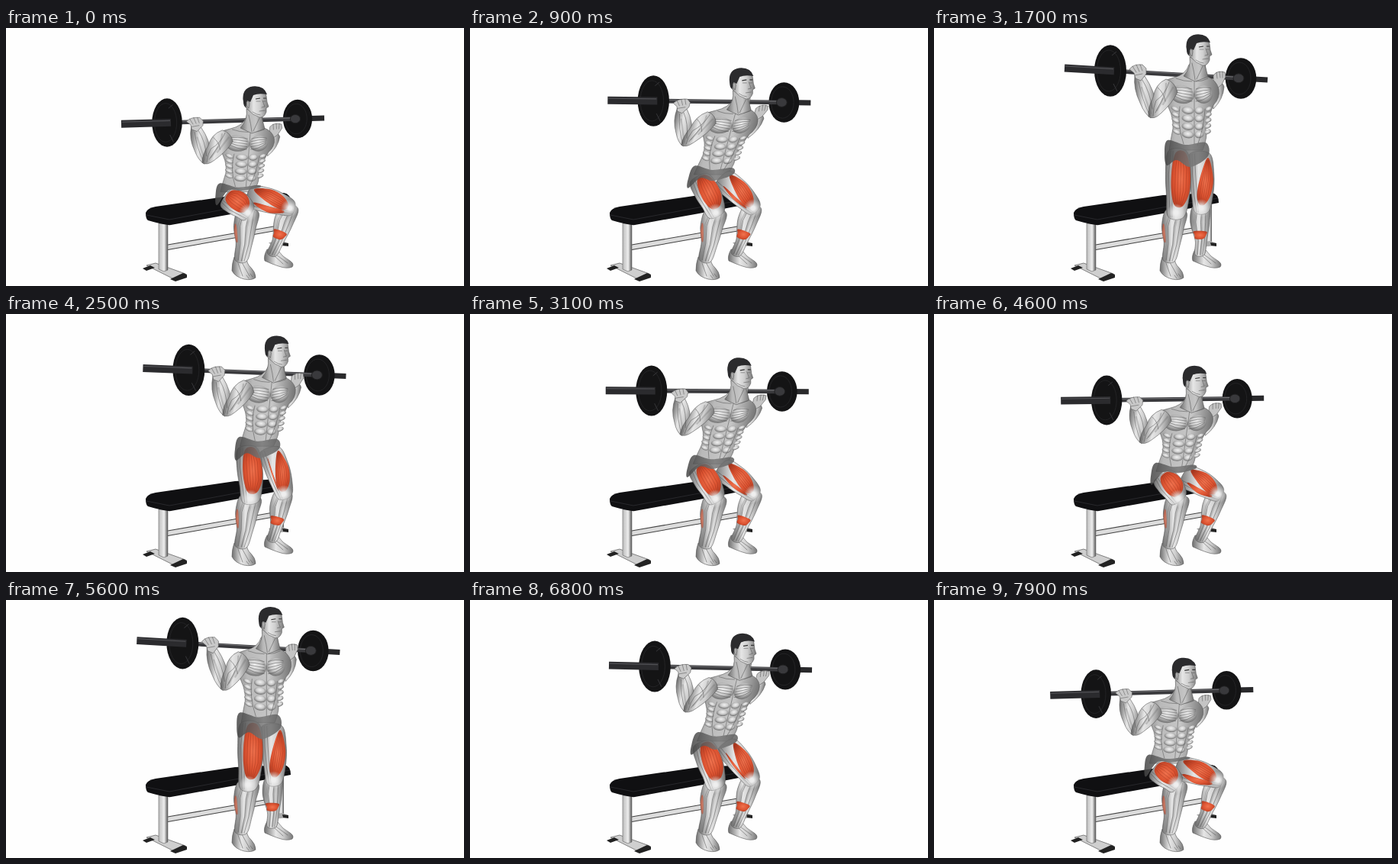
An HTML page for the animation above (8 s loop, 600x338 px).

```html
<!DOCTYPE html>
<html lang="en">
<head>
<meta charset="utf-8">
<title>Barbell bench squat</title>
<style>
  html, body { margin: 0; width: 100%; height: 100%; overflow: hidden; background: #fefefe; }
  svg { display: block; width: 100vw; height: 100vh; }
  .skin { stroke: #555; stroke-width: .6; stroke-linejoin: round; }
  .line { fill: none; stroke: #484848; stroke-width: .7; stroke-linecap: round; opacity: .7; }
  .soft { fill: none; stroke: #666; stroke-width: 2.4; stroke-linecap: round; opacity: .28; }
  .fibre { fill: none; stroke: #8f2c18; stroke-width: .7; opacity: .5; }
</style>
</head>
<body>
<svg viewBox="0 0 600 338" preserveAspectRatio="none">
  <defs>
    <linearGradient id="body">
      <stop offset="0" stop-color="#6d6d6d"/><stop offset=".3" stop-color="#b9b9b9"/>
      <stop offset=".65" stop-color="#c6c6c6"/><stop offset="1" stop-color="#747474"/>
    </linearGradient>
    <linearGradient id="limb">
      <stop offset="0" stop-color="#6f6f6f"/><stop offset=".4" stop-color="#e6e6e6"/>
      <stop offset=".65" stop-color="#cfcfcf"/><stop offset="1" stop-color="#777"/>
    </linearGradient>
    <radialGradient id="bulge" cx=".5" cy=".4" r=".55">
      <stop offset="0" stop-color="#f0f0f0"/><stop offset=".55" stop-color="#cdcdcd"/>
      <stop offset="1" stop-color="#7d7d7d"/>
    </radialGradient>
    <radialGradient id="glow">
      <stop offset=".2" stop-color="#eee"/><stop offset="1" stop-color="#ddd" stop-opacity="0"/>
    </radialGradient>
    <radialGradient id="red" r=".62">
      <stop offset="0" stop-color="#f0734f"/><stop offset=".55" stop-color="#dc5331"/>
      <stop offset="1" stop-color="#a93a22"/>
    </radialGradient>
    <linearGradient id="shorts">
      <stop offset="0" stop-color="#444"/><stop offset=".6" stop-color="#787878"/><stop offset="1" stop-color="#5c5c5c"/>
    </linearGradient>
    <linearGradient id="post">
      <stop offset="0" stop-color="#bbb"/><stop offset=".6" stop-color="#eee"/><stop offset="1" stop-color="#555"/>
    </linearGradient>
  </defs>

  <g id="bench">
    <path d="M356 231h8v51h-8z" fill="url(#post)"/>
    <path d="M344 281l18 -2 8 3v3l-20 2z" fill="#aaa"/><path d="M362 281l8 1v4l-7 -1z" fill="#222"/>
    <path d="M212 284L356 259v6L212 291z" fill="#dcdcdc"/>
    <path d="M212 284L356 259M212 290.5L356 265" stroke="#444" stroke-width="1.1"/>
    <path d="M184 311l12 -3 39 14 -1 5 -14 2z" fill="#cfcfcf" stroke="#555" stroke-width=".7"/>
    <path d="M179 315l10 -4 6 3 -11 4zM215 329l17 -8 5 2v4l-15 5z" fill="#222"/>
    <path d="M200 256h12v61l-5 2 -7 -3z" fill="url(#post)" stroke="#666" stroke-width=".6"/>
    <path d="M183 242Q185 236 196 234L300 219 364 216Q373 217 373 229L300 243 216 258Q210 259 186 252Q183 250 183 242Z" fill="#101012"/>
    <path d="M184 245L214 251 300 235 372 223" fill="none" stroke="#333337" stroke-width=".7"/>
  </g>

  <g id="bar">
    <path id="farEnd" stroke="#29292b" stroke-width="7"/>
    <g id="farPlate">
      <ellipse rx="20.3" ry="26.8" fill="#141415"/>
      <ellipse cx="-2" rx="15" ry="21" fill="none" stroke="#242426"/>
    </g>
    <path id="shaft" stroke="#39393c" stroke-width="5.6"/>
    <path id="shine" stroke="#737376"/>
    <ellipse id="collar" rx="7" ry="6" fill="#39393c" stroke="#1f1f20"/>
    <g id="nearPlate">
      <ellipse rx="21" ry="33.8" fill="#141415"/>
      <ellipse cx="-2" rx="15.5" ry="27" fill="none" stroke="#242426"/>
      <path d="M4 17l5 10M2 -20l6 -5" stroke="#38383b"/>
    </g>
    <path id="sleeve" stroke="#2b2b2e" stroke-width="9.8"/>
    <path id="sleeveShine" stroke="#505054" stroke-width="1.2"/>
  </g>

  <g id="upper">
    <path class="skin" fill="url(#limb)" d="M364 74Q378 68 380 77 379 93 366 106L360 92Z"/>
    <path class="skin" fill="#c4c4c4" d="M366 62Q371 55 381 58L382 64 377 74 370 80 366 72Z"/>
    <path class="line" d="M370 58l1 8M374 57l1 8M378 57v8M372 79Q374 90 366 99"/>
    <path class="skin" fill="url(#body)" d="M334 48Q330 61 314 65 298 69 291 80 303 92 308 106 314 119 313 132 310 146 308 160L352 160Q359 142 356 132 360 115 366 101 375 92 373 80 370 68 357 63L355 46Z"/>
    <g id="muscles"></g>
    <path class="line" d="M341 69V152M334 50Q338 63 341 69M354 52Q348 62 344 69M322 103Q318 126 327 152M355 106Q354 130 345 154"/>
    <path class="skin" fill="url(#limb)" d="M263 62Q261 80 270 98 276 113 284 118L292 104Q289 82 276 63Z"/>
    <path class="skin" fill="url(#limb)" d="M304 67Q290 73 287 91 280 104 281 116 288 121 297 112 312 99 319 84 316 71 304 67Z"/>
    <path class="soft" d="M272 78L284 112M304 73Q305 88 292 108M313 78L300 100"/>
    <path class="line" d="M268 70Q272 93 283 115M273 68Q283 84 286 106M293 78Q302 86 303 96M308 71Q303 87 291 95 287 104 287 115M300 92L290 111"/>
    <path class="skin" fill="#c9c9c9" d="M256 54Q261 47 273 48L278 53 278 60 271 69 264 66 262 59Z"/>
    <path class="line" d="M260 50l5 8M265 48l4 9M270 48l3 8M263 62l10 -2"/>
  </g>

  <g id="head">
    <path class="skin" fill="url(#body)" d="M335 38Q337 52 327 63L342 70 359 64 354 45Z"/>
    <path class="line" d="M338 46Q341 58 342 68M352 50L344 67"/>
    <path class="skin" fill="url(#limb)" d="M331 24Q332 10 346 10 360 10 361 21L362 29 364 35 361 37 361 42Q358 50 352 49 343 46 337 39 332 36 331 24Z"/>
    <path fill="#2b2b2d" d="M331 29Q328 11 343 8.5 358 7 362 19 351 17 344 20L340 29 336 27 334 36Q331 34 331 29Z"/>
    <path class="skin" fill="#aaa" d="M335 29Q338 26 339 31L338 37Q335 36 335 29Z"/>
    <path fill="none" stroke="#333" stroke-width="1.2" d="M347 25l6 -1M357 24h4"/>
    <path class="line" d="M348 28h5M357 28h3M356 27l3 8 -4 1M352 41l7 -1M343 42Q349 46 353 46"/>
  </g>

  <g class="skin" fill="url(#limb)">
    <path d="M342 290Q337 299 339 305 348 309 357 312 368 316 375 313 378 309 372 305 362 300 356 291Z"/>
    <path d="M299 300Q296 308 296 318 300 326 312 329 322 331 327 327 327 320 321 314 315 309 315 300Z"/>
    <path class="line" d="M350 297l13 12M354 297l15 11M304 308l6 17M309 307l10 18M315 324l3 4M320 322l3 4"/>
  </g>
  <g id="legs"></g>
</svg>
<script>
const el = id => document.getElementById(id);
const mix = (a, b, u) => a + (b - a) * u;
const ramp = (t, from, to) => {
  const u = Math.min(1, Math.max(0, (t - from) / (to - from)));
  return u * u * (3 - 2 * u);
};

function add(parent, tag, attrs) {
  const node = document.createElementNS('http://www.w3.org/2000/svg', tag);
  for (const k in attrs) node.setAttribute(k, attrs[k]);
  return el(parent).appendChild(node);
}

// Two repetitions per loop; 0 is seated, 1 is standing.
const LOOP = 8000, REP = 4000;
const rise = t => ramp(t, 180, 1680) * (1 - ramp(t, 1815, 4065));

// Chest muscles, mirrored about the breastbone; the far side is narrower.
function addMuscles() {
  const bulge = (cx, cy, rx, ry, turn = 0) => add('muscles', 'ellipse',
    { cx, cy, rx, ry, fill: 'url(#bulge)', transform: `rotate(${turn} ${cx} ${cy})` });
  const line = d => add('muscles', 'path', { class: 'line', d });
  for (const side of [-1, 1]) {
    const depth = side < 0 ? 1 : .75, x = off => 341 + side * depth * off;
    bulge(x(16), 87, 16 * depth, 12, side * -12);
    for (let i = 0; i < 5; i++) line(`M${x(3)} ${80 + i * 4}Q${x(16)} ${76 + i * 5} ${x(29)} ${79 + i * 2}`);
    for (let row = 0; row < 4; row++) bulge(x(8.5), 108 + row * 10.5, 8 * depth, 4.8, side * -8);
    for (let rib = 0; rib < 5; rib++) bulge(x(25 - rib * .4), 106 + rib * 7.5, 6 * depth, 2.8, side * -28);
    line(`M${x(3)} 70Q${x(14)} 70 ${x(24)} 66`);
  }
}

const pair = p => p[0].toFixed(2) + ' ' + p[1].toFixed(2);
const stroke = pts => 'M' + pts.map(pair).join('L');

function closed(pts) {
  const n = pts.length, at = i => pts[(i + n) % n];
  const handle = (i, s) => [0, 1].map(k => at(i)[k] + s * (at(i + 1)[k] - at(i - 1)[k]) / 6);
  return 'M' + pair(pts[0]) + pts.map((_, i) =>
    'C' + [handle(i, 1), handle(i + 1, -1), at(i + 1)].map(pair).join(' ')).join('') + 'Z';
}

// A bone carries profile rows: [position along, reach left, reach right].
function lane(a, b, rows, f) {
  const dx = b[0] - a[0], dy = b[1] - a[1], len = Math.hypot(dx, dy);
  return rows.map(([u, left, right]) => {
    const off = mix(-left, right, f) / len;
    return [a[0] + dx * u + dy * off, a[1] + dy * u - dx * off];
  });
}
const limb = (a, b, rows) => closed([...lane(a, b, rows, 1), ...lane(a, b, rows, 0).reverse()]);
const lanes = (a, b, rows, at) => at.map(f => stroke(lane(a, b, rows, f))).join('');

const profile = {
  farShin: [[-.05, 10, 10], [.3, 14, 11], [.7, 7, 8], [1, 7, 5]],
  farCalf: [[.5, 9, 7], [.58, 8, 7], [.66, 7, 3]],
  farThigh: [[-.05, 13, 13], [.35, 14, 18], [.75, 12, 16], [1.08, 8, 9]],
  farQuad: [[.08, -8, 13], [.45, 1, 17], [.75, 5, 13], [.93, 2, 5]],
  nearShin: [[-.05, 12, 13], [.3, 16, 13], [.65, 10, 11], [1, 8, 7]],
  nearCalf: [[.28, 15, -13], [.45, 14, -10], [.62, 10, -8]],
  nearThigh: [[-.12, 12, 12], [.3, 15, 18], [.7, 13, 17], [1.08, 10, 10]],
  nearQuad: [[-.1, 2, 10], [.2, 7, 17], [.6, 7, 17], [.87, 2, 9]],
};
const underThigh = k => [[.15, 5 + 3 * k, -5], [.5, 5 + 8 * k, -5], [.85, 5 + 4 * k, -5]];

const nodes = {};
const path = (name, attrs) => { nodes[name] = add('legs', 'path', attrs); };
for (const side of ['far', 'near']) {
  path(side + 'Shin', { class: 'skin', fill: 'url(#limb)' });
  path(side + 'ShinShade', { class: 'soft' });
  path(side + 'ShinLines', { class: 'line' });
  path(side + 'Calf', { fill: 'url(#red)', opacity: side === 'far' ? 1 : .6 });
  path(side + 'Thigh', { class: 'skin', fill: 'url(#limb)' });
  path(side + 'ThighLines', { class: 'line' });
  if (side === 'far') path('under', { fill: 'url(#red)' });
  path(side + 'Quad', { fill: 'url(#red)' });
  path(side + 'Fibres', { class: 'fibre' });
  nodes[side + 'Knee'] = add('legs', 'ellipse', { rx: 12, ry: 12, fill: 'url(#glow)' });
}
path('shorts', { fill: 'url(#shorts)', opacity: .85 });
const draw = (name, d) => nodes[name].setAttribute('d', d);

function drawLeg(side, hip, knee, ankle) {
  const shin = profile[side + 'Shin'], thigh = profile[side + 'Thigh'], quad = profile[side + 'Quad'];
  draw(side + 'Shin', limb(knee, ankle, shin));
  draw(side + 'ShinShade', lanes(knee, ankle, shin, [.2, .6]));
  draw(side + 'ShinLines', lanes(knee, ankle, shin, [.28, .55, .8]));
  draw(side + 'Calf', limb(knee, ankle, profile[side + 'Calf']));
  draw(side + 'Thigh', limb(hip, knee, thigh));
  draw(side + 'ThighLines', lanes(hip, knee, thigh, [.12, .25]));
  draw(side + 'Quad', limb(hip, knee, quad));
  draw(side + 'Fibres', lanes(hip, knee, quad, [.2, .35, .5, .65, .8]));
  nodes[side + 'Knee'].setAttribute('transform', `translate(${knee})`);
}

function drawBar(x, y, tilt, size) {
  const span = 171, slope = tilt / span;
  const at = (dx, lift = 0) => [x + dx, y + slope * dx - lift];
  const line = (id, from, to, lift) => el(id).setAttribute('d', stroke([at(from, lift), at(to, lift)]));
  line('farEnd', span, span + 35);
  line('shaft', 0, span);
  line('shine', 0, span - 4, 1.4);
  line('sleeve', -60, 5);
  line('sleeveShine', -59, 4, 2.6);
  const place = (id, dx) => el(id).setAttribute('transform', `translate(${at(dx)}) scale(${size})`);
  place('farPlate', span);
  place('nearPlate', 0);
  place('collar', span - 3);
}

function render(t) {
  const p = rise(t % LOOP % REP), swing = Math.sin(Math.PI * p);

  // Neck path, forward lean and height of the trunk.
  const x = mix(324, 344, p) + 20 * swing, y = mix(126, 58, p) + 8 * swing;
  const lean = -.07 * (1 - p) - .2 * swing ** 2, tall = mix(.87, 1, p ** 3);
  const trunk = (px, py) => [x + px - 344 + lean * (py - 58), y + tall * (py - 58)];
  el('upper').setAttribute('transform', `matrix(1 0 ${lean} ${tall} ${x} ${y}) translate(-344 -58)`);
  el('head').setAttribute('transform', `translate(${x - 344} ${y - 58})`);
  drawBar(x - 113, y - 2 - 4.5 * swing, mix(-5, 10, p), 1 - .06 * (1 - p) ** 2);

  const farHip = trunk(348, 168), farKnee = [372 - 22 * p ** 4, 236];
  drawLeg('far', farHip, farKnee, [349, 297]);
  draw('under', limb(farHip, farKnee, underThigh(1 - p)));
  drawLeg('near', trunk(319, 170), [317 + 5 * swing, 242], [308, 305]);
  draw('shorts', closed([
    trunk(306, 147), trunk(330, 153), trunk(356, 150), trunk(359, 153 + 15 * p),
    trunk(336, 158 + 24 * p), trunk(318, 158 + 15 * p), trunk(305, 180), trunk(302, 165)]));
}

addMuscles();
const start = performance.now();
function tick(now) {
  render(Math.max(0, now - start));
  requestAnimationFrame(tick);
}
render(0);
requestAnimationFrame(tick);
</script>
</body>
</html>
```
